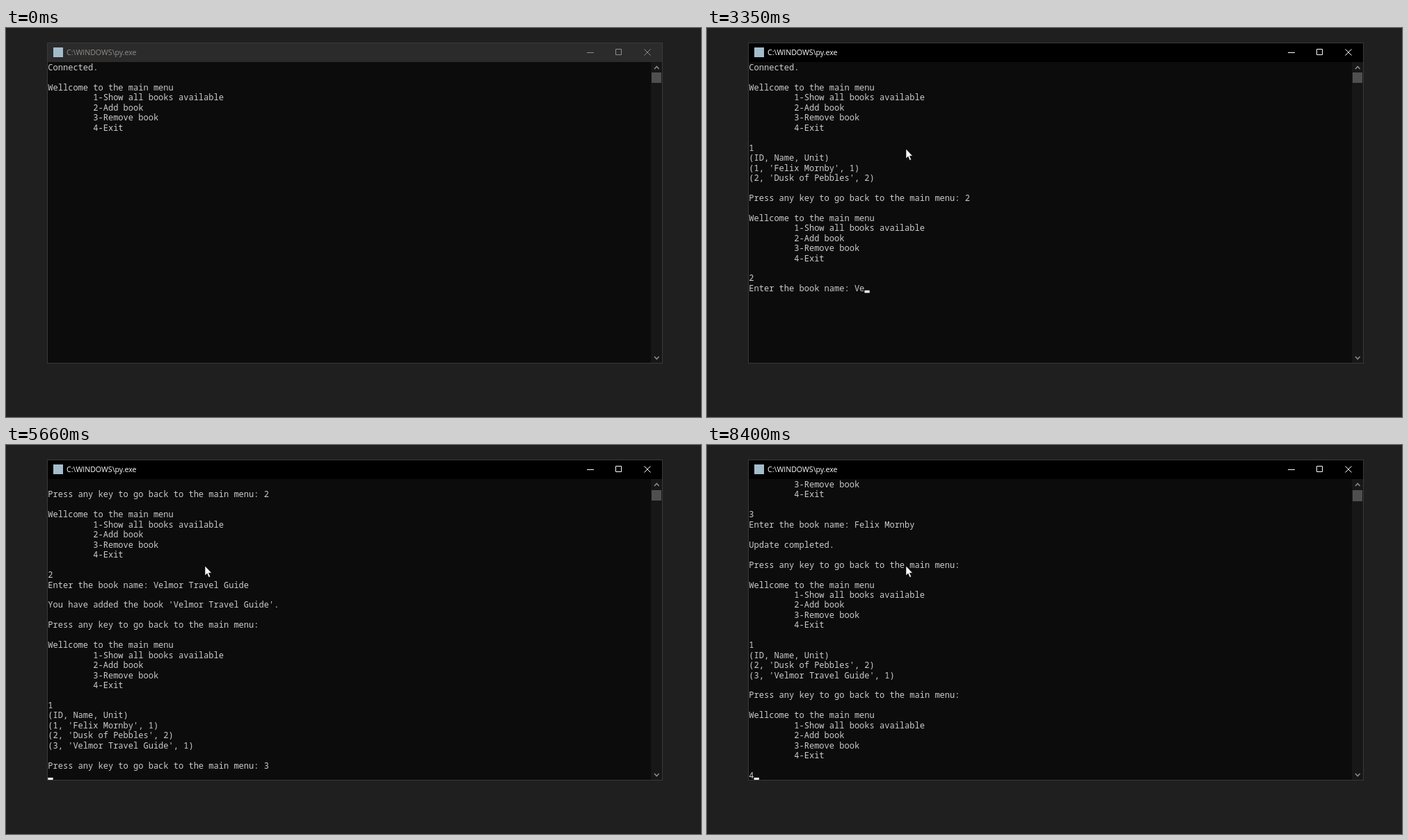
Write an HTML page that moves like this. It is 999 by 560 pixels and loops after 8.53 s.

```html
<!DOCTYPE html>
<html lang="en">
<head>
<meta charset="utf-8">
<title>Library console</title>
<style>
  html, body { margin: 0; width: 100%; height: 100%; overflow: hidden; background: #1f1f1f; }
  svg { display: block; width: 999px; height: 560px; }
  #lines text { font: 12.04px "Noto Sans Mono", "DejaVu Sans Mono", monospace; fill: #ccc; white-space: pre; }
  #title { font: 10.6px "Open Sans", "Noto Sans", sans-serif; }
  #win { --bar: #2b2b2b; --ink: #928d89; }
  #win.active { --bar: #000; --ink: #fff; }
  #bar { fill: var(--bar); }
  #title { fill: var(--ink); }
  #buttons { stroke: var(--ink); fill: none; }
  .chevron { stroke: #8a8a8a; stroke-width: 1.6; fill: none; }
</style>
</head>
<body>
<svg viewBox="0 0 999 560">
  <defs><clipPath id="pane"><rect x="60" y="49" width="867" height="433"/></clipPath></defs>
  <g id="win">
    <rect x="59.5" y="21.5" width="884" height="461" fill="#0c0c0c" stroke="#393939"/>
    <rect id="bar" x="60" y="22" width="883" height="27"/>
    <rect x="68" y="28" width="14" height="14" fill="#a3bccb"/>
    <text id="title" x="87" y="39">C:\WINDOWS\py.exe</text>
    <g id="buttons">
      <path d="M835 35.5h10M876.5 30.5h8v8h-8z"/>
      <path d="M917.5 30.5l9 9M926.5 30.5l-9 9"/>
    </g>
    <rect x="927" y="49" width="16" height="433" fill="#171717"/>
    <rect id="thumb" x="928" y="64" width="14" height="15" fill="#4d4f51"/>
    <path class="chevron" d="M932 59l3.3 -3.5l3.3 3.5M932 473l3.3 3.5l3.3 -3.5"/>
  </g>
  <g clip-path="url(#pane)">
    <g id="lines"></g>
    <rect id="caret" width="7.3" height="3.6" fill="#f2f2f2"/>
  </g>
  <path id="mouse" d="M0 0v14l3.1 -2.9l2.3 5.3l2.3 -1l-2.3 -5.1h4.2z" fill="#fff" stroke="#000" stroke-width=".6"/>
</svg>
<script>
const LOOP = 8530, ROWS = 30, CHAR_W = 7.224, LINE_H = 14.45, LEFT = 60.3, BASE = 61;
const $ = id => document.getElementById(id);

const ITEMS = ["1-Show all books available", "2-Add book", "3-Remove book", "4-Exit"];
const MENU = ["Wellcome to the main menu", ...ITEMS.map(s => " ".repeat(9) + s)].join("\n") + "\n\n";
const BACK = "Press any key to go back to the main menu: ";
const ASK = "\nEnter the book name: ";
const FIRST = "Felix Mornby", SECOND = "Dusk of Pebbles", ADDED = "Velmor Travel Guide";
const ROW = [`(1, '${FIRST}', 1)`, `(2, '${SECOND}', 2)`, `(3, '${ADDED}', 1)`];
const list = (...rows) => ["\n(ID, Name, Unit)", ...rows, "", BACK].join("\n");

// Spreads a text over n keystroke steps between two times
const typed = (text, from, to, n) => Array.from({ length: n }, (_, i) => {
  const cut = k => Math.round(text.length * k / n);
  return [from + (to - from) * i / (n - 1), text.slice(cut(i), cut(i + 1)), 1];
});

// [time, appended text, caret visible]
const steps = [
  [0, "Connected.\n\n" + MENU, 0],
  [880, "", 1],
  [1010, "1", 1],
  [1270, list(ROW[0], ROW[1]), 1],
  [1780, "", 0],
  [1910, "2", 1],
  [1980, "\n\n" + MENU, 1],
  [2170, "2", 1],
  [2360, ASK, 1],
  [2570, "", 0],
  [3030, "", 1],
  ...typed(ADDED.slice(0, 3), 3220, 3420, 3),
  ...typed(ADDED.slice(3), 3480, 4200, 10),
  [4330, `\n\nYou have added the book '${ADDED}'.\n\n` + BACK, 1],
  [4460, "", 0],
  [4590, "\n\n" + MENU, 1],
  [4850, "1", 1],
  [5120, list(...ROW), 1],
  [5270, "", 0],
  [5590, "3", 1],
  [5660, "\n", 1],
  [5720, "\n" + MENU, 1],
  [5910, "3", 1],
  [6040, ASK, 1],
  [6160, "", 0],
  [6360, "", 1],
  ...typed(FIRST, 6490, 6890, 7),
  [6950, "\n\nUpdate completed.\n\n" + BACK, 1],
  [7220, "", 0],
  [7350, "\n\n" + MENU, 1],
  [7420, "1", 1],
  [7540, list(ROW[1], ROW[2]), 1],
  [7730, "", 0],
  [7800, "\n\n" + MENU, 1],
  [8120, "4", 1],
  [8270, "", 0],
  [8400, "", 1],
];

let log = "";
const states = steps.map(([time, text, caret]) => ({ time, caret, lines: (log += text).split("\n") }));

const rows = Array.from({ length: ROWS }, (_, i) => {
  const el = document.createElementNS("http://www.w3.org/2000/svg", "text");
  el.setAttribute("x", LEFT);
  el.setAttribute("y", BASE + i * LINE_H);
  return $("lines").appendChild(el);
});

function showState({ lines, caret }) {
  const last = lines.length - 1, top = Math.max(0, last - ROWS + 1);
  rows.forEach((el, i) => { el.textContent = lines[top + i] || ""; });
  $("caret").setAttribute("x", LEFT + lines[last].length * CHAR_W);
  $("caret").setAttribute("y", BASE - 1.2 + (last - top) * LINE_H);
  $("caret").style.visibility = caret ? "visible" : "hidden";
  $("thumb").setAttribute("y", top ? 65 : 64);
  $("thumb").setAttribute("height", top > 30 ? 16 : 15);
}

function showMouse(t) {
  const p = Math.min(1, Math.max(0, Math.floor((t - 120) / 70) / 8));
  const rest = (1 - p) ** 2;
  $("mouse").style.visibility = t < 120 ? "hidden" : "visible";
  $("mouse").setAttribute("transform", `translate(${286 + 26 * rest} ${174 + 189 * rest})`);
}

let shown;
const start = performance.now();
function draw(now) {
  const t = Math.max(0, now - start) % LOOP;
  const state = states.findLast(s => s.time <= t);
  if (state !== shown) showState(shown = state);
  showMouse(t);
  $("win").classList.toggle("active", t >= 750);
  requestAnimationFrame(draw);
}
draw(start);
</script>
</body>
</html>
```
